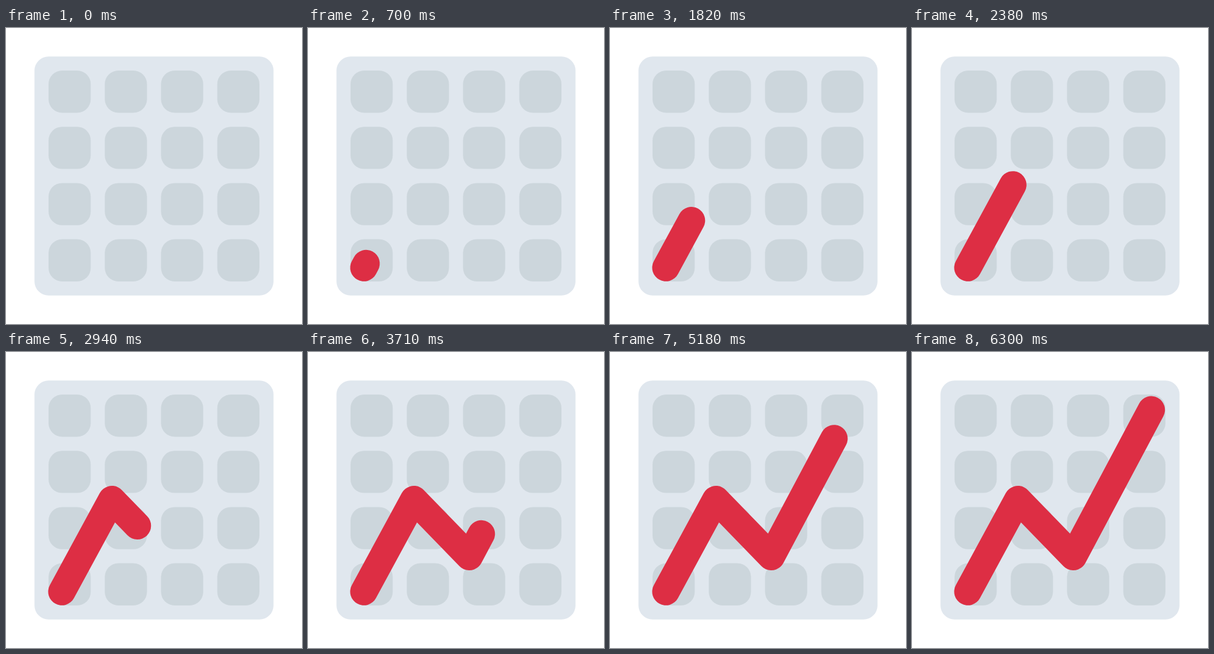
Recreate the animation shown at these times as an HTML page. Size 480x480 px, loop 8000 ms.

```html
<!DOCTYPE html>
<html lang="en">
<head>
<meta charset="utf-8">
<title>Rising chart</title>
<style>
  html, body { margin: 0; width: 100%; height: 100%; overflow: hidden; background: #fff; }
  svg { display: block; width: 100%; height: 100%; }
</style>
</head>
<body>
<svg viewBox="0 0 480 480">
  <rect x="46.2" y="46.2" width="387.6" height="387.6" rx="22.8" fill="#e0e7ee"/>
  <g id="tiles" fill="#ccd6dc"></g>
  <path id="line" d="M90.6 388.6 L171.7 239.2 L261.5 331.8 L388 93.8" fill="none"
        stroke="#dd2e44" stroke-width="44.4" stroke-linecap="round" stroke-linejoin="round"
        visibility="hidden"/>
</svg>
<script>
  const LOOP = 8000, STEP = 70;
  const APPEAR = 420, EASE_START = 250, EASE_LENGTH = 6140, FINISH = 6300;
  const TILE = 68.4, PITCH = 91.2, ORIGIN = 69;

  const tiles = document.getElementById('tiles');
  for (let i = 0; i < 16; i++) {
    const tile = document.createElementNS('http://www.w3.org/2000/svg', 'rect');
    const attributes = {
      x: ORIGIN + (i % 4) * PITCH,
      y: ORIGIN + Math.floor(i / 4) * PITCH,
      width: TILE, height: TILE, rx: 22
    };
    for (const name in attributes) tile.setAttribute(name, attributes[name]);
    tiles.append(tile);
  }

  const line = document.getElementById('line');
  const total = line.getTotalLength();

  // Sine ease in and out along the whole polyline.
  function progress(time) {
    if (time >= FINISH) return 1;
    return (1 - Math.cos(Math.PI * (time - EASE_START) / EASE_LENGTH)) / 2;
  }

  const start = performance.now();
  function draw() {
    const elapsed = Math.max(0, performance.now() - start) % LOOP;
    const time = Math.floor(elapsed / STEP) * STEP;
    line.setAttribute('visibility', time < APPEAR ? 'hidden' : 'visible');
    line.setAttribute('stroke-dasharray', `${progress(time) * total} ${total * 2}`);
    requestAnimationFrame(draw);
  }
  draw();
</script>
</body>
</html>
```
